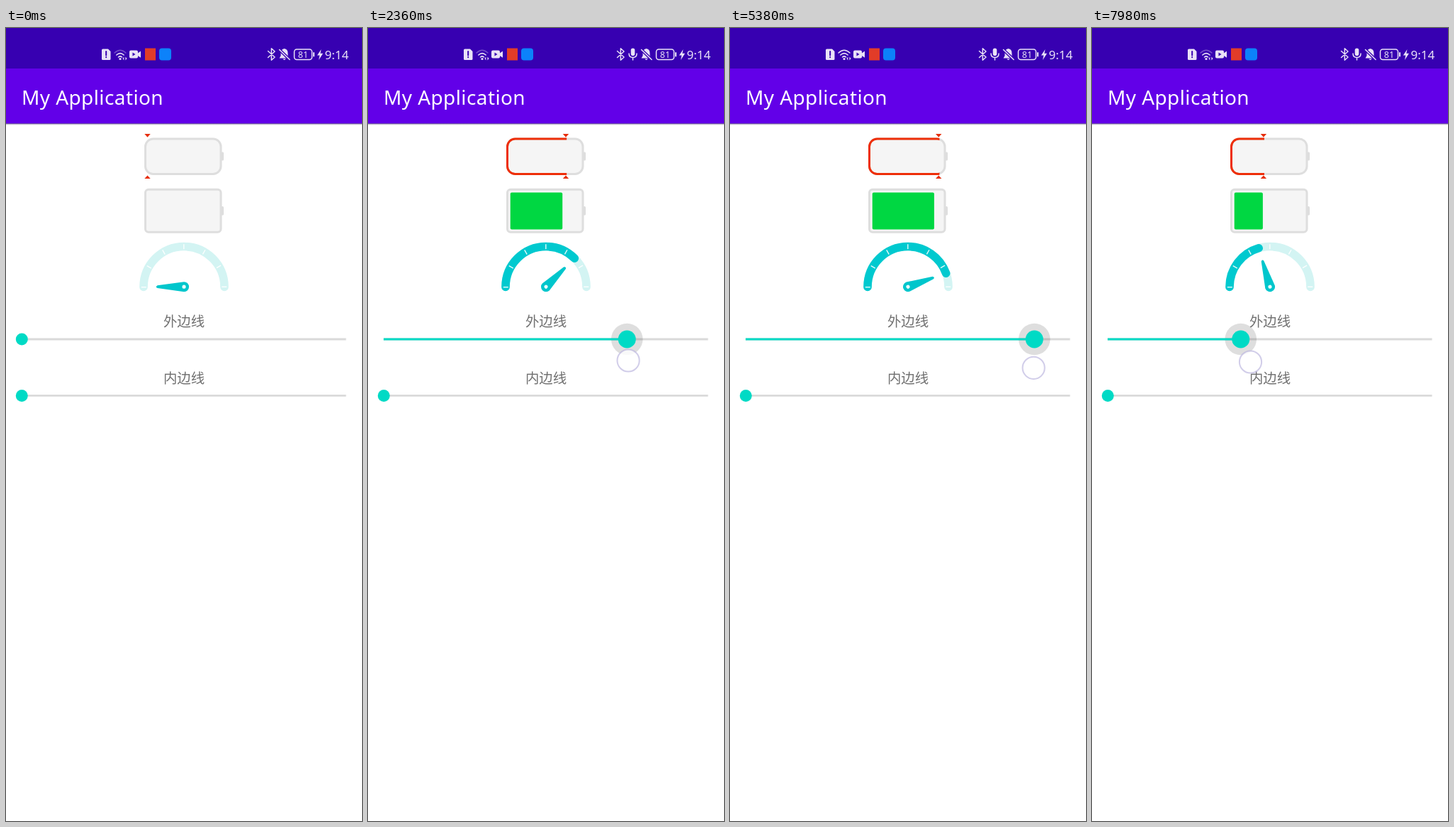
Recreate the animation shown at these times as an HTML page. Size 502x1116 px, loop 8000 ms.

```html
<!DOCTYPE html>
<html lang="zh">
<head>
<meta charset="utf-8">
<style>
html, body { margin: 0; width: 100%; height: 100%; overflow: hidden; background: #fff; }
svg { display: block; width: 502px; height: 1116px; }
text { font-family: "Noto Sans", "Open Sans", sans-serif; }
.label { font: 19.4px "Noto Sans CJK SC", "Noto Sans CJK", sans-serif; fill: #707070; text-anchor: middle; }
.shell { fill: #f5f5f5; stroke: #dedede; stroke-width: 3; }
.arc { fill: none; stroke-width: 11.6; stroke-linecap: round; }
.line { fill: none; stroke: #e9e2f7; stroke-width: 1.5; stroke-linecap: round; stroke-linejoin: round; }
</style>
</head>
<body>
<svg viewBox="0 0 502 1116">
  <defs>
    <linearGradient id="shade" x2="0" y2="1">
      <stop stop-color="#32107a" stop-opacity=".75"/>
      <stop offset="1" stop-color="#999" stop-opacity="0"/>
    </linearGradient>
    <clipPath id="edgeClip"><rect id="edge" x="190" y="150" width="0" height="62"/></clipPath>
  </defs>

  <rect width="502" height="57.5" fill="#3700b1"/>
  <rect y="57" width="502" height="77.5" fill="#6200e8"/>
  <rect y="134" width="502" height="3" fill="url(#shade)"/>
  <text x="22" y="108" font-size="28" font-weight="500" letter-spacing=".4" fill="#fff">My Application</text>

  <!-- status bar -->
  <g fill="#e9e2f7">
    <path d="M136.500 29.500H144L147.500 33V43.500Q147.500 45 146 45H136.500Q135 45 135 43.500V31Q135 29.500 136.500 29.500Z"/>
    <path d="M141.200 33V38.500M141.200 41V41.300" stroke="#3700b1" stroke-width="2" stroke-linecap="round"/>
    <g class="line" stroke-width="1.8">
      <path id="wifiOuter" d="M153 35Q161 27.500 169 35"/>
      <path d="M155.800 38Q161 33.200 166.200 38"/>
      <path d="M158.500 41Q161 38.800 163.500 41"/>
    </g>
    <circle cx="161" cy="43.500" r="1.600"/>
    <path d="M164.500 43L166.300 40.500V45.500ZM170.500 43L168.500 40.500V45.500Z"/>
    <rect x="174" y="31.500" width="12" height="11" rx="2"/>
    <path d="M185 36L190 32.500V41.800L185 38.500Z"/>
    <path d="M178.500 34.500V39.500L182.500 37Z" fill="#3700b1"/>
    <rect x="196" y="28.500" width="15" height="17" fill="#e23c28"/>
    <rect x="216" y="28.500" width="17" height="17" rx="4" fill="#0c82fa"/>
    <path id="bluetooth" class="line" d="M369.500 32.500L379 41L374.300 45.200V28.800L379 33L369.500 41.500"/>
    <g id="mic">
      <rect x="370.700" y="28.500" width="5.600" height="10.500" rx="2.800"/>
      <path class="line" d="M368 36Q368 41.500 373.500 41.500Q379 41.500 379 36M373.500 41.500V45"/>
    </g>
    <path d="M392.500 29Q397.500 29.500 397.500 36V39L399.500 42.500H385.500L387.500 39V36Q387.500 29.500 392.500 29ZM390.500 43.500H394.500Q392.500 46.500 390.500 43.500Z"/>
    <path d="M385.500 30.500L400 44.500" stroke="#3700b1" stroke-width="4"/>
    <path class="line" d="M385.500 30.500L400 44.500"/>
    <rect class="line" x="406.500" y="30" width="25" height="14.500" rx="3.500"/>
    <rect x="433" y="34" width="2" height="6.500" rx="1"/>
    <text x="419" y="41.800" font-size="12.500" text-anchor="middle">81</text>
    <path d="M444.500 30L438.800 38.500H442.300L441 45L447 35.800H443.300Z"/>
    <text x="449.500" y="43.500" font-size="17">9:14</text>
  </g>

  <!-- outlined battery -->
  <rect x="303" y="174.500" width="4" height="12" rx="1.500" fill="#dedede"/>
  <rect class="shell" x="196.500" y="156" width="106.500" height="49.500" rx="11"/>
  <rect x="196.500" y="156" width="106.500" height="49.500" rx="11" fill="none" stroke="#ee2e08" stroke-width="3" clip-path="url(#edgeClip)"/>
  <path id="arrows" d="M-4.200 149H4.200L0 153.800ZM-4.200 212H4.200L0 207.500Z" fill="#e62e0c"/>

  <!-- filled battery -->
  <rect x="303" y="251" width="4" height="12.500" rx="1.500" fill="#dedede"/>
  <rect class="shell" x="196.500" y="227.300" width="106.500" height="60" rx="4.500"/>
  <rect id="charge" x="200.700" y="231.500" height="52" rx="2" fill="#00d742"/>

  <!-- gauge -->
  <path class="arc" d="M194 364.500A57 57 0 0 1 308 364.500" stroke="#d3f4f3"/>
  <path class="arc" id="sweep" pathLength="180" d="M194 364.500A57 57 0 0 1 308 364.500" stroke="#00c9cf"/>
  <g id="ticks" stroke="#fff" stroke-width="1.400" stroke-opacity=".9"></g>
  <g id="needle">
    <path d="M251 357.200L213.500 362.300Q210.300 364.200 213.500 366.100L251 371.200A7 7 0 0 0 251 357.200Z" fill="#00c6cc"/>
    <circle cx="251" cy="364.200" r="2.600" fill="#e9fbfb"/>
  </g>

  <!-- sliders -->
  <text class="label" x="251" y="420.300">外边线</text>
  <text class="label" x="251" y="499.800">内边线</text>
  <path d="M22 438H479.500M22 517.400H479.500" stroke="#dadada" stroke-width="2.800"/>
  <circle cx="22.300" cy="517.400" r="8.500" fill="#00dac5"/>
  <circle id="ripple" cy="438" r="22.300" fill="#000" fill-opacity=".13"/>
  <path id="track" stroke="#00dac5" stroke-width="2.800"/>
  <circle id="thumb" cy="438" fill="#00dac5"/>
  <circle id="finger" r="15.600" fill="#fff" fill-opacity=".8" stroke="#b9b2de" stroke-opacity=".65" stroke-width="2"/>
</svg>
<script>
const $ = id => document.getElementById(id);
const set = (id, attrs) => { for (const k in attrs) $(id).setAttribute(k, attrs[k]); };
const clamp = (v, lo, hi) => Math.min(hi, Math.max(lo, v));

const LOOP = 8000, PRESS = 760, MIC = 500;
const LEFT = 22.3, SPAN = 457.2;

// time, thumb x, finger x, finger y
const drag = [
  [760, 36, 42, 448], [920, 50, 62, 449], [1240, 114, 132, 453],
  [1660, 219, 236, 461], [2360, 365, 367, 468], [3480, 406.5, 407.5, 472],
  [4180, 443, 449, 475], [4460, 461.5, 465, 476], [4800, 479.5, 483, 479],
  [5080, 479.5, 482, 481], [5820, 306, 299, 472], [6060, 269, 265, 470.5],
  [6660, 183, 177, 473], [7150, 142, 143, 475], [7580, 153, 164, 475],
  [7980, 209.5, 223.5, 470]
];

function slope(i, col) {
  const a = drag[i - 1], b = drag[i], c = drag[i + 1];
  if (!a || !c) return 0;
  const before = (b[col] - a[col]) / (b[0] - a[0]);
  const after = (c[col] - b[col]) / (c[0] - b[0]);
  return before * after <= 0 ? 0 : 2 * before * after / (before + after);
}

// Monotone cubic through the drag points
function sample(t, col) {
  const last = drag.length - 1;
  t = clamp(t, drag[0][0], drag[last][0]);
  let i = 0;
  while (i < last - 1 && t > drag[i + 1][0]) i++;
  const a = drag[i], b = drag[i + 1], h = b[0] - a[0], u = (t - a[0]) / h, v = 1 - u;
  return a[col] * v * v * (1 + 2 * u) + b[col] * u * u * (3 - 2 * u)
    + h * u * v * (slope(i, col) * v - slope(i + 1, col) * u);
}

for (let a = 0; a <= 180; a += 30) {
  $('ticks').insertAdjacentHTML('beforeend',
    `<path d="M190.800 364.700H197.800" transform="rotate(${a} 251 364.500)"/>`);
}

function draw(t) {
  const pressed = t >= PRESS;
  const p = pressed ? clamp(Math.round((sample(t, 1) - LEFT) / SPAN * 100), 0, 100) / 100 : 0;
  const x = LEFT + p * SPAN;
  const mark = 197.2 + 109 * p;

  set('edge', { width: p ? mark + 1.2 - 190 : 0 });
  set('arrows', { transform: `translate(${clamp(mark, 199.5, 302.3)})` });
  set('charge', { width: 98 * p });
  set('sweep', { 'stroke-dasharray': `${180 * p} 400`, visibility: p ? 'visible' : 'hidden' });
  set('needle', { transform: `rotate(${180 * p} 251 364.200)` });

  set('track', { d: `M22 438H${x}` });
  set('thumb', { cx: x, r: 8.5 + 4 * clamp((t - 900) / 600, 0, 1) });
  set('ripple', { cx: x, visibility: pressed ? 'visible' : 'hidden' });
  set('finger', { cx: sample(t, 2), cy: sample(t, 3), visibility: pressed ? 'visible' : 'hidden' });

  set('mic', { visibility: t >= MIC ? 'visible' : 'hidden' });
  set('bluetooth', { transform: `translate(${t >= MIC ? -18 : 0})` });
  set('wifiOuter', { opacity: t > 5100 && t < 6760 ? 1 : .35 });
}

function tick() {
  draw(performance.now() % LOOP);
  requestAnimationFrame(tick);
}
tick();
</script>
</body>
</html>
```
